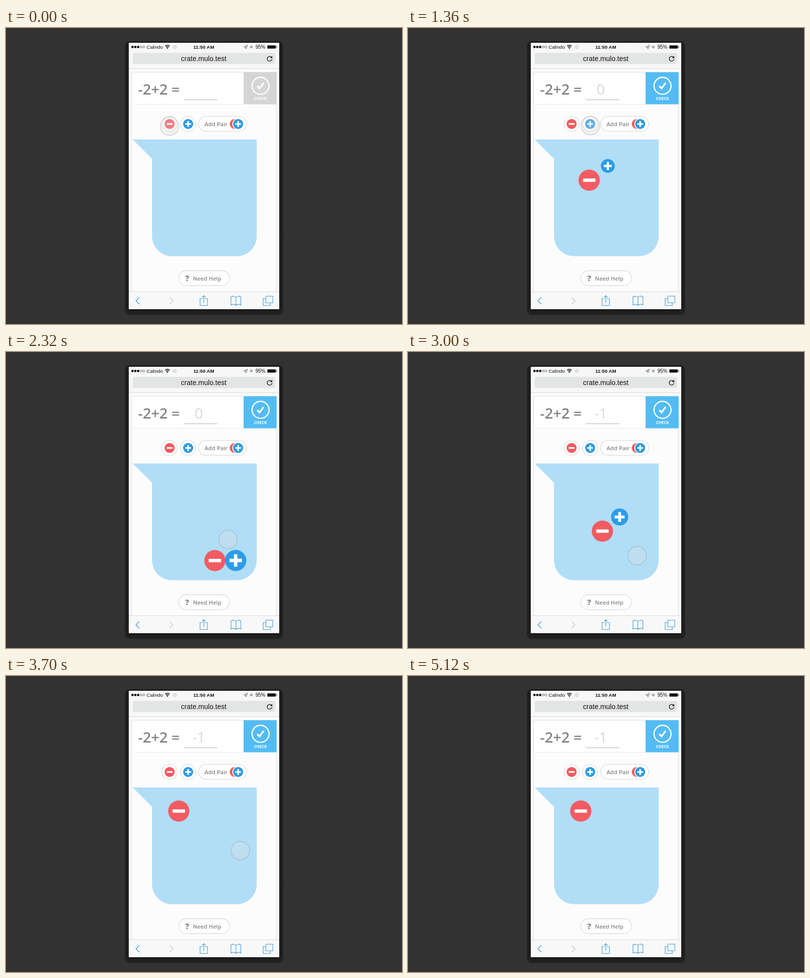
Animation, 800 px wide and 600 px high, one loop 5140 ms. Source, as an HTML page:

```html
<!DOCTYPE html>
<html lang="en">
<head>
<meta charset="utf-8">
<title>Integer tiles</title>
<style>
  html, body { margin: 0; width: 100%; height: 100%; overflow: hidden; }
  body { background: #333 repeating-linear-gradient(55deg, #343434 0 2px, #313131 2px 4px); }
  svg { display: block; width: 800px; height: 600px; }
  text { font-family: "Open Sans", sans-serif; }
  .sys { font-family: "Liberation Sans", Arial, sans-serif; fill: #111; }
  .label { font-weight: 600; fill: #858585; }
  .mid { text-anchor: middle; }
  .pill { fill: #fff; stroke: #dcdcdc; stroke-width: 1.3; }
  .icon { fill: none; stroke: #439bd6; stroke-width: 1.1; }

  #touch, #check, .ball, .answer {
    animation: 5140ms linear infinite;
  }
  #touch { animation-name: touch; animation-timing-function: cubic-bezier(.37, 0, .63, 1); }
  #check { animation-name: check; }
  #minusBall { animation-name: minus-ball; animation-timing-function: ease-in-out; }
  #plusBall { animation-name: plus-ball; animation-timing-function: ease-in-out; }
  #negOne { animation-name: neg-one; animation-timing-function: step-end; }
  #zero { animation-name: zero; animation-timing-function: step-end; }

  @keyframes touch {
    0%, 14.4% { transform: translate(330.5px, 199px); }
    21.8%, 35.8% { transform: translate(368.5px, 198px); }
    48.4%, 67.1% { transform: translate(463px, 413px); }
    83.5%, 100% { transform: translate(515px, 122px); }
    0%, 88% { opacity: 1; }
    91%, 100% { opacity: 0; }
  }
  @keyframes check {
    0%, 2.5% { fill: #d5d5d5; }
    6%, 100% { fill: #53bcf4; }
  }
  @keyframes neg-one {
    0% { opacity: 0; }
    3% { opacity: 1; }
    24.5% { opacity: 0; }
    56.4% { opacity: 1; }
  }
  @keyframes zero {
    0% { opacity: 0; }
    24.5% { opacity: 1; }
    56.4% { opacity: 0; }
  }
  @keyframes minus-ball {
    0%, 1.19% { opacity: 0; }
    1.2%, 100% { opacity: 1; }
    0%, 1.2% { transform: translate(330.5px, 194.5px) scale(.47); }
    7% { transform: translate(351px, 280px) scale(1.04); }
    9.7% { transform: translate(348px, 272px) scale(1); }
    11.7%, 24.1% { transform: translate(349px, 273.7px) scale(1); }
    31.5% { transform: translate(428px, 435px) scale(1); }
    32.68% { transform: translate(426.4px, 432px) scale(1); }
    36% { transform: translate(420.5px, 420px) scale(1); }
    39%, 55.4% { transform: translate(422px, 422.7px) scale(1); }
    62.3% { transform: translate(346px, 268px) scale(1); }
    64.98% { transform: translate(347.7px, 271.2px) scale(1); }
    67%, 100% { transform: translate(349px, 273.7px) scale(1); }
  }
  @keyframes plus-ball {
    0%, 22.99% { opacity: 0; }
    23%, 66.5% { opacity: 1; }
    66.51%, 100% { opacity: 0; }
    0%, 23% { transform: translate(368px, 194.5px) scale(.47); }
    31.5% { transform: translate(471px, 440px) scale(1); }
    32.68% { transform: translate(470px, 436.7px) scale(1); }
    36% { transform: translate(462.5px, 420px) scale(1); }
    39%, 54.5% { transform: translate(464px, 422.5px) scale(1); }
    63.6% { transform: translate(367px, 188px) scale(.49); }
    64.98% { transform: translate(367px, 191.3px) scale(.49); }
    66.5%, 100% { transform: translate(368px, 194.5px) scale(.47); }
  }
</style>
</head>
<body>
<svg viewBox="0 0 800 600">
  <defs>
    <filter id="soft" x="-10%" y="-10%" width="120%" height="120%"><feGaussianBlur stdDeviation="3"/></filter>
    <linearGradient id="glass" x2="0" y2="1">
      <stop offset="0" stop-color="#e8e8e8" stop-opacity=".24"/>
      <stop offset="1" stop-color="#dadada" stop-opacity=".34"/>
    </linearGradient>
    <g id="minus">
      <circle r="21.5" fill="#f25b61"/>
      <path d="M-12.5 0h25" stroke="#fff" stroke-width="6.8"/>
    </g>
    <g id="plus">
      <circle r="21.5" fill="#2e9be6"/>
      <path d="M-12.5 0h25M0-12.5v25" stroke="#fff" stroke-width="6.8"/>
    </g>
  </defs>

  <!-- Phone -->
  <rect x="240" y="27" width="320" height="555" rx="9" fill="#242424"/>
  <rect x="246" y="31" width="308" height="543" rx="3" fill="#151515" filter="url(#soft)"/>
  <rect x="248" y="30" width="304" height="540" rx="1.5" fill="#fcfcfc"/>

  <!-- Status and address bars -->
  <rect x="248" y="30" width="304" height="52.5" rx="1.5" fill="#f7f7f7"/>
  <path d="M248 82.5h304" stroke="#d8d8d8"/>
  <g fill="#111">
    <circle cx="255.5" cy="38.5" r="2.4"/>
    <circle cx="261.2" cy="38.5" r="2.4"/>
    <circle cx="266.9" cy="38.5" r="2.4"/>
  </g>
  <g fill="none" stroke="#333" stroke-width=".7">
    <circle cx="272.6" cy="38.5" r="2"/>
    <circle cx="278.3" cy="38.5" r="2"/>
  </g>
  <text class="sys" x="284" y="42" font-size="9.8">Calindo</text>
  <g fill="none" stroke="#111" stroke-width="1.5">
    <path d="M321.3 37a6.7 6.7 0 0 1 9.4 0M323.3 39.2a3.8 3.8 0 0 1 5.4 0"/>
    <circle cx="326" cy="41" r=".5"/>
  </g>
  <circle cx="341" cy="38.5" r="2.6" fill="none" stroke="#999" stroke-width="2" stroke-dasharray=".8 1.24"/>
  <text class="sys mid" x="399.5" y="42" font-size="9.8" font-weight="700">11:50 AM</text>
  <path d="M480.5 38.5l7.5-3.6-3.4 7.4-.4-3.6z" fill="none" stroke="#555" stroke-width=".9"/>
  <circle cx="495.5" cy="38.5" r="2.8" fill="#aaa"/>
  <text class="sys" x="504" y="42" font-size="10">95%</text>
  <rect x="528" y="35.3" width="17" height="6.4" rx="1" fill="#111"/>
  <path d="M546.5 37v3" stroke="#111" stroke-width="1.2"/>

  <rect x="256" y="50.5" width="288" height="22.5" rx="4" fill="#e3e4e4"/>
  <text class="sys mid" x="399.5" y="66.5" font-size="14">crate.mulo.test</text>
  <g transform="translate(.7 0)">
    <path d="M536.2 60.2a4.8 4.8 0 1 0 .5 2.6" fill="none" stroke="#111" stroke-width="1.3"/>
    <path d="M537.2 56.5v4.6h-4.6z" fill="#111"/>
  </g>

  <!-- Problem header -->
  <path d="M253.5 534V89.5h293V534" fill="none" stroke="#dcdcdc"/>
  <rect x="254" y="90" width="292" height="64" fill="#fff"/>
  <path d="M254 154.5h292" stroke="#ececec"/>
  <text class="label" x="266.7" y="135" font-size="29.5">-2+2 =</text>
  <path d="M359 145.5h68" stroke="#b0b0b0"/>
  <g class="mid" fill="#d9d9d9" font-size="29.5">
    <text id="negOne" class="answer" x="389.5" y="135">-1</text>
    <text id="zero" class="answer" x="389.5" y="135">0</text>
  </g>
  <rect id="check" x="480" y="89.700" width="66.700" height="64.900" fill="#d5d5d5"/>
  <g fill="none" stroke="#fff">
    <circle cx="514.2" cy="117.2" r="17.2" stroke-width="2.4"/>
    <path d="M507.500 117.700l4.800 4.800 8.200-11.300" stroke-width="3.4"/>
  </g>
  <text class="mid" x="514" y="146" font-size="8" font-weight="700" fill="#fff">CHECK</text>

  <!-- Tile buttons -->
  <circle class="pill" cx="330.5" cy="194.5" r="15.4"/>
  <circle class="pill" cx="368" cy="194.5" r="15.4"/>
  <rect class="pill" x="389" y="179.3" width="97" height="30" rx="15"/>
  <use href="#minus" transform="translate(330.5 194.5) scale(.47)"/>
  <use href="#plus" transform="translate(368 194.5) scale(.47)"/>
  <text class="label" x="401" y="198.5" font-size="11.5">Add Pair</text>
  <circle cx="462" cy="194.5" r="10" fill="#f25b61"/>
  <circle cx="469" cy="194.5" r="11.8" fill="#fff"/>
  <use href="#plus" transform="translate(469 194.5) scale(.47)"/>

  <!-- Beaker -->
  <path d="M256 226H506.5V422.5a40 40 0 0 1-40 40H335a40 40 0 0 1-40-40V265Z" fill="#b1def7"/>

  <rect class="pill" x="349" y="492" width="102.5" height="30" rx="15"/>
  <text class="label mid" x="366" y="513" font-size="16" style="font-weight:800">?</text>
  <text class="label" x="377.5" y="511.5" font-size="11.4">Need Help</text>

  <!-- Browser toolbar -->
  <path d="M248 534h304v36H248z" fill="#f8f8f8"/>
  <path d="M248 534.5h304" stroke="#d8d8d8"/>
  <g class="icon">
    <path d="M269.5 546l-7 7 7 7" stroke-width="1.4"/>
    <path d="M330.5 546l7 7-7 7" stroke="#c4c4c4"/>
    <path d="M397 548.5h-5v14h15v-14h-5M399.5 557v-14.5M396 546l3.5-3.5 3.5 3.5"/>
    <path d="M464.5 546.5c-2-3.5-7-3.5-10-1.5v16.5c3-2 8-2 10 1 2-3 7-3 10-1v-16.5c-3-2-8-2-10 1.5zv16"/>
    <path d="M525 548.5h-5.5v14h14.5v-5M525 543.5h14v13.5h-14z"/>
  </g>

  <g id="minusBall" class="ball"><use href="#minus"/></g>
  <g id="plusBall" class="ball"><use href="#plus"/></g>
  <g id="touch">
    <circle r="18.7" fill="url(#glass)" stroke="#909090" stroke-opacity=".4" stroke-width="1.4"/>
  </g>
</svg>
</body>
</html>
```
